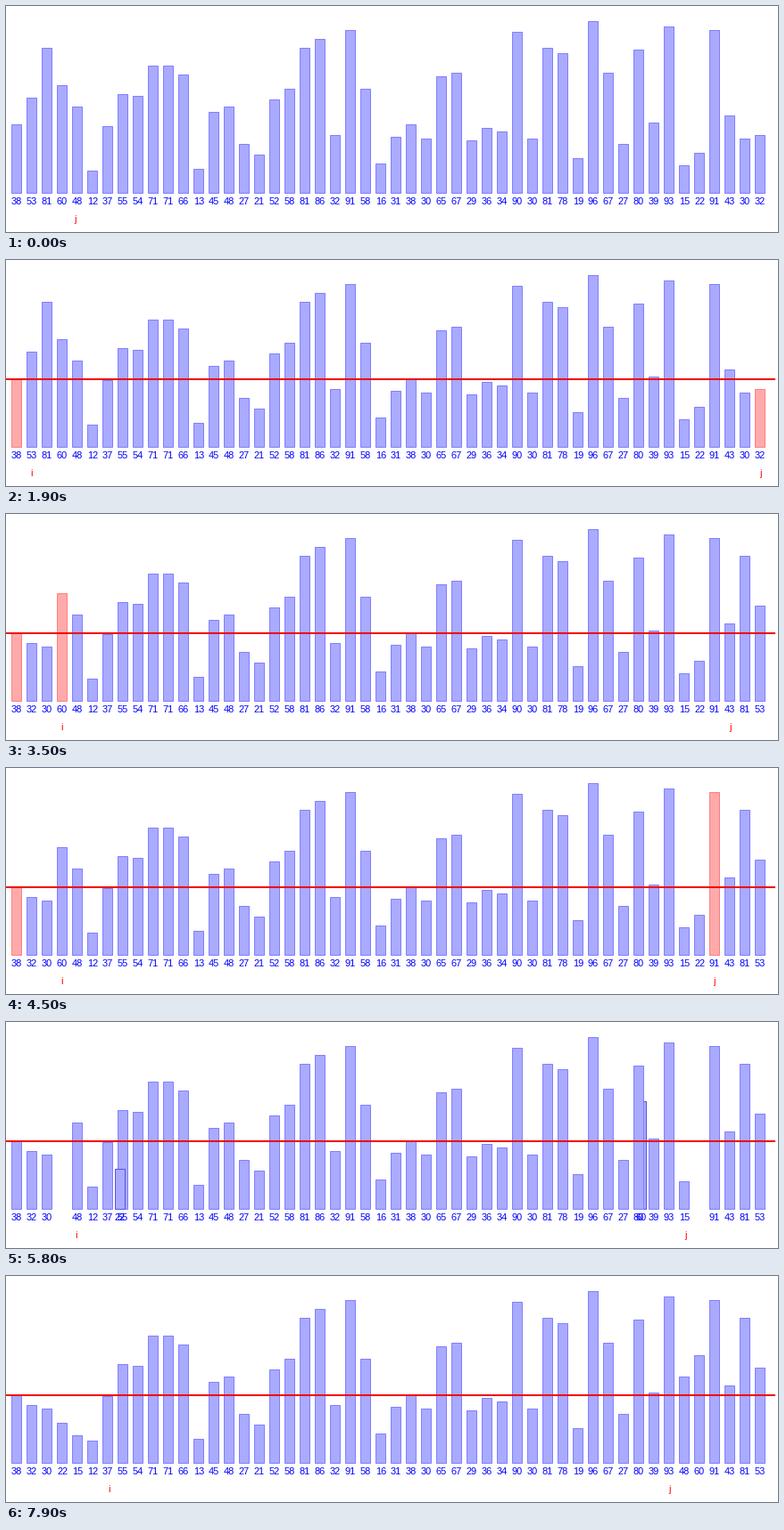
A matplotlib script that plays this animation: 865x254 px, repeating every 8 s.

```python
import matplotlib.pyplot as plt
from matplotlib.animation import FuncAnimation
from matplotlib.patches import Rectangle

W, H, DPI = 865, 254, 100
FRAMES, INTERVAL = 80, 100
TICKS = 3            # simulation ticks per drawn frame
MOVE, LOOK = 11, 21  # ticks: slide length, switch from i to j

VALUES = [38, 53, 81, 60, 48, 12, 37, 55, 54, 71, 71, 66, 13, 45, 48, 27, 21,
          52, 58, 81, 86, 32, 91, 58, 16, 31, 38, 30, 65, 67, 29, 36, 34, 90,
          30, 81, 78, 19, 96, 67, 27, 80, 39, 93, 15, 22, 91, 43, 30, 32]

# start tick, new i, new j, swap the old pair while sliding
MOVES = [(34, 1, 49, False), (63, 2, 48, True), (94, 3, 47, True),
         (124, 3, 46, False), (144, 3, 45, False), (164, 4, 44, True),
         (195, 5, 43, True), (215, 6, 43, False), (236, 7, 43, False)]

BLUE = ("#aaaaff", "#8080ff")
MOVING = ("#aaaaff", "#5555e6")
PINK = ("#ffaaaa", "#ff8080")


def slot_x(k):
    return 12 + 17 * k


def mix(a, b, p):
    return a + (b - a) * p


def state(tick):
    """Values, bar centres, bar styles and label positions at a tick."""
    vals = list(VALUES)
    xs = [slot_x(k) for k in range(len(vals))]
    styles = [BLUE] * len(vals)
    i, j = 1, None
    xi, xj = None, 78
    for start, ni, nj, swap in MOVES:
        if tick <= start:
            break
        p = min((tick - start) / MOVE, 1)
        from_i = slot_x(i)
        from_j = 78 if j is None else slot_x(j)
        xi, xj = mix(from_i, slot_x(ni), p), mix(from_j, slot_x(nj), p)
        styles = [BLUE] * len(vals)
        if p < 1:
            if swap:
                xs[i], xs[j] = mix(from_i, from_j, p), mix(from_j, from_i, p)
                styles[i] = styles[j] = MOVING
            break
        if swap:
            vals[i], vals[j] = vals[j], vals[i]
        scan_i = (j is None or ni != i) and tick < start + LOOK
        styles[0] = styles[ni if scan_i else nj] = PINK
        i, j = ni, nj
    return vals, xs, styles, xi, xj


fig = plt.figure(figsize=(W / DPI, H / DPI), dpi=DPI, facecolor="white")
ax = fig.add_axes([0, 0, 1, 1])
ax.set_xlim(0, W)
ax.set_ylim(H, 0)
ax.axis("off")


def label(y, text, color):
    return ax.text(0, y, text, color=color, family="Liberation Sans",
                   size=11 * 72 / DPI, ha="center", va="baseline")


bars = [ax.add_patch(Rectangle((0, 0), 11, 1, lw=72 / DPI, snap=False))
        for _ in VALUES]
nums = [label(223, "", "#0000ff") for _ in VALUES]
pivot = ax.add_patch(Rectangle((0, 133), 862, 2, lw=0, color="#f00000",
                               snap=False, zorder=2))
mark_i = label(243, "i", "#ff0000")
mark_j = label(243, "j", "#ff0000")


def draw(n):
    tick = n * TICKS
    vals, xs, styles, xi, xj = state(tick)
    for bar, num, v, x, (fill, edge) in zip(bars, nums, vals, xs, styles):
        bar.set_bounds(round(x) - 5.5, 209.5 - 2 * v, 11, 2 * v + 1)
        bar.set_facecolor(fill)
        bar.set_edgecolor(edge)
        num.set_text(str(v))
        num.set_x(x)
    pivot.set_visible(tick > MOVES[0][0])
    mark_i.set_visible(xi is not None)
    mark_i.set_x(xi or 0)
    mark_j.set_x(xj)
    return [*bars, *nums, pivot, mark_i, mark_j]


anim = FuncAnimation(fig, draw, frames=FRAMES, interval=INTERVAL,
                     repeat=True, repeat_delay=0, blit=False)
plt.show()
```
